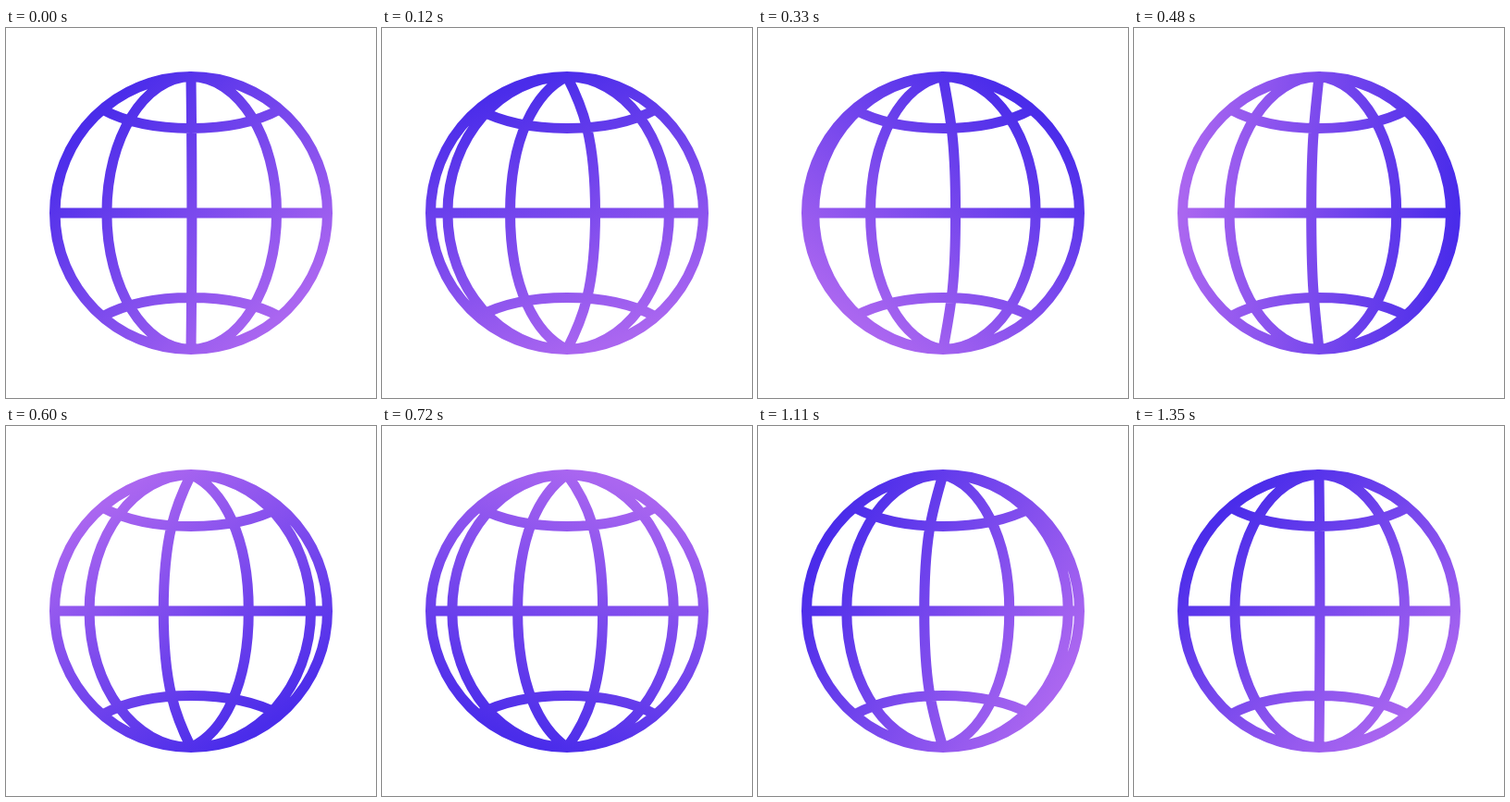
An HTML page with a canvas that plays this animation: 400x400 px, repeating every 1440 ms.

```html
<!DOCTYPE html>
<html lang="en">
<head>
<meta charset="utf-8">
<title>Spinning globe</title>
<style>
  html, body { margin: 0; width: 100%; height: 100%; overflow: hidden; background: #fff; }
  canvas { display: block; width: 400px; height: 400px; }
</style>
</head>
<body>
<canvas id="stage" width="400" height="400"></canvas>
<script>
const ctx = document.getElementById('stage').getContext('2d');
const LOOP = 1440, STEP = 30, SPIN_END = 1350, TURNS = 5;
const R = 147.5, KAPPA = 0.5523;

// Equator offsets a meridian passes through from the left to the right edge.
const STOPS = [-R, -92, 0, 92, R];

// Spin curve: [time in ms, meridian steps, speed in steps per second].
const SPIN = [
  [0, 0.01, 2.2], [210, 0.645, 3.8], [480, 1.91, 5.6], [720, 3.42, 5.2],
  [870, 4.09, 3.8], [1110, 4.78, 1.95], [SPIN_END, 5.01, 0]
];

function spinAt(t) {
  if (t >= SPIN_END) return SPIN[SPIN.length - 1][1];
  const i = SPIN.findIndex(knot => knot[0] > t) - 1;
  const [t0, y0, v0] = SPIN[i], [t1, y1, v1] = SPIN[i + 1];
  const dt = (t1 - t0) / 1000, s = (t - t0) / (t1 - t0), r = 1 - s;
  return y0 * r * r * (1 + 2 * s) + y1 * s * s * (3 - 2 * s)
    + dt * s * r * (v0 * r - v1 * s);
}

function meridian(u) {
  const i = Math.min(3, Math.floor(u));
  const x = STOPS[i] + (STOPS[i + 1] - STOPS[i]) * (u - i);
  // Handles turn toward the axis as the curve flattens into the centre line.
  const pole = R - 49 * Math.max(0, 1 - Math.abs(u - 2));
  ctx.moveTo(0, -R);
  ctx.bezierCurveTo(x * KAPPA, -pole, x, -R * KAPPA, x, 0);
  ctx.bezierCurveTo(x, R * KAPPA, x * KAPPA, pole, 0, R);
}

function parallel(side) {
  ctx.moveTo(-96, side * 112);
  ctx.bezierCurveTo(-70, side * 98, -35, side * 91.5, 0, side * 91.5);
  ctx.bezierCurveTo(35, side * 91.5, 70, side * 98, 96, side * 112);
}

function gradient(angle) {
  const x = R * Math.cos(angle), y = R * Math.sin(angle);
  const fill = ctx.createLinearGradient(x, y, -x, -y);
  fill.addColorStop(0, '#4a2cea');
  fill.addColorStop(1, '#aa66f0');
  return fill;
}

function draw(t) {
  const spin = spinAt(t);
  ctx.setTransform(1, 0, 0, 1, 0, 0);
  ctx.fillStyle = '#fff';
  ctx.fillRect(0, 0, 400, 400);
  ctx.translate(200, 200);
  ctx.lineWidth = 11;
  ctx.lineJoin = 'round';
  ctx.strokeStyle = gradient(Math.PI * (1.25 + 2 * spin / TURNS));
  ctx.beginPath();
  ctx.arc(0, 0, R, 0, 2 * Math.PI);
  ctx.moveTo(-R, 0);
  ctx.lineTo(R, 0);
  parallel(-1);
  parallel(1);
  for (let k = 0; k < 4; k++) meridian(k + spin % 1);
  ctx.stroke();
}

const start = performance.now();
function tick() {
  const t = (performance.now() - start) % LOOP;
  draw(Math.floor(t / STEP) * STEP);
  requestAnimationFrame(tick);
}
tick();
</script>
</body>
</html>
```
